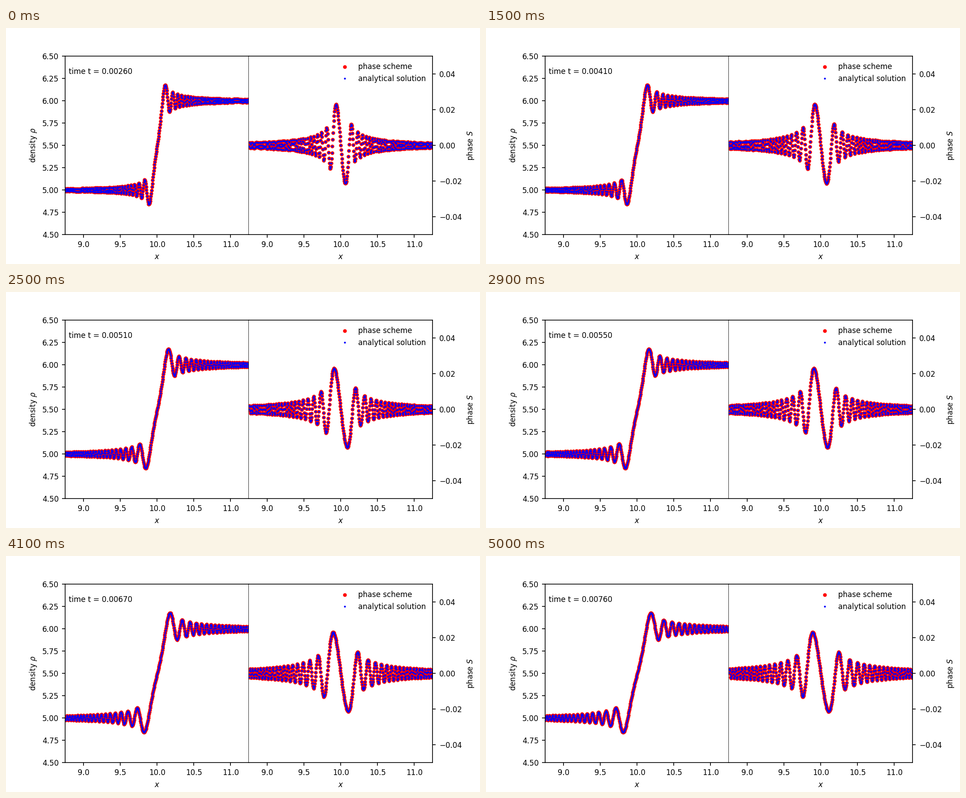
These frames come from a looping animation (1058 px wide and 529 px high, 5100 ms). A matplotlib script:

```python
import numpy as np
import matplotlib.pyplot as plt
from matplotlib.animation import FuncAnimation

DPI = 150
FRAMES, INTERVAL = 51, 100
T_START, T_STEP = 0.0026, 0.0001
RHO_LEFT, RHO_RIGHT = 5.0, 6.0
CENTER, HALF_WIDTH, DX = 10.0, 1.25, 0.005

plt.rcParams.update({"font.family": "DejaVu Sans", "font.size": 8})

# Complex Fresnel integral C(u) + iS(u), tabulated once by the trapezoid rule.
U = np.linspace(0, 16, 40001)
integrand = np.exp(0.5j * np.pi * U**2)
FRESNEL = np.concatenate(
    ([0], np.cumsum((integrand[1:] + integrand[:-1]) / 2) * U[1]))


def wave(x, t):
    """Free Schroedinger evolution of a density step located at CENTER."""
    u = (x - CENTER) / np.sqrt(np.pi * t)
    fresnel = np.sign(u) * np.interp(np.abs(u), U, FRESNEL)
    a, b = np.sqrt(RHO_LEFT), np.sqrt(RHO_RIGHT)
    return (a + b) / 2 + (b - a) / 2 * (1 - 1j) * fresnel


def add_curves(ax):
    style = dict(marker="o", linestyle="none")
    scheme, = ax.plot([], [], color="red", ms=3, label="phase scheme", **style)
    exact, = ax.plot([], [], color="blue", ms=1, label="analytical solution",
                     **style)
    return scheme, exact


def style_axes(left, right):
    for ax in (left, right):
        ax.set_xlim(CENTER - HALF_WIDTH, CENTER + HALF_WIDTH)
        ax.set_xlabel("$x$")
    left.set_ylim(4.5, 6.5)
    left.set_ylabel(r"density $\rho$")
    right.set_ylim(-0.05, 0.05)
    right.set_ylabel("phase $S$")
    right.yaxis.tick_right()
    right.yaxis.set_label_position("right")
    right.spines["left"].set_visible(False)


fig, (ax_rho, ax_phase) = plt.subplots(
    1, 2, figsize=(1058 / DPI, 529 / DPI), dpi=DPI)
fig.subplots_adjust(left=0.125, right=0.9, bottom=0.125, top=0.88, wspace=0)
style_axes(ax_rho, ax_phase)

rho_curves = add_curves(ax_rho)
phase_curves = add_curves(ax_phase)
ax_phase.legend(loc="upper right", frameon=False)
clock = ax_rho.text(0.02, 0.9, "", transform=ax_rho.transAxes)

n = round(HALF_WIDTH / DX)
x = CENTER + DX * np.arange(-n, n + 1)


def update(frame):
    t = T_START + T_STEP * frame
    psi = wave(x, t)
    for curve in rho_curves:
        curve.set_data(x, np.abs(psi)**2)
    for curve in phase_curves:
        curve.set_data(x, np.angle(psi))
    clock.set_text(f"time t = {t:.5f}")
    return (*rho_curves, *phase_curves, clock)


anim = FuncAnimation(fig, update, frames=FRAMES, interval=INTERVAL,
                     repeat=True, repeat_delay=0)
plt.show()
```
